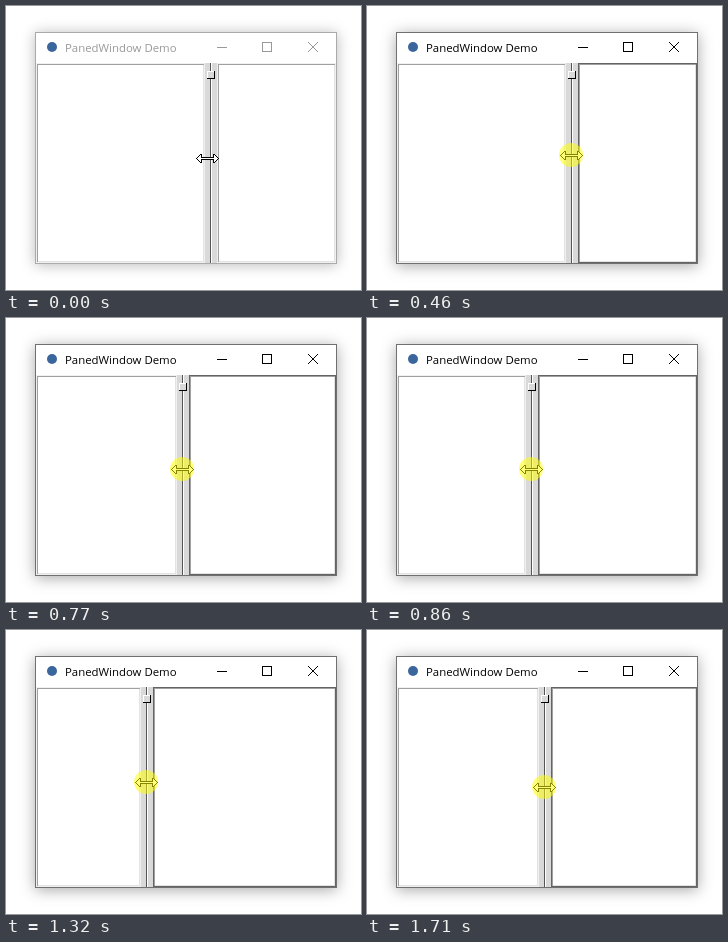
Recreate the animation shown at these times as an HTML page. Size 355x284 px, loop 1790 ms.

```html
<!DOCTYPE html>
<html lang="en">
<head>
<meta charset="utf-8">
<title>PanedWindow Demo</title>
<style>
  html, body { margin: 0; width: 100%; height: 100%; overflow: hidden; background: #fff; }
  #shadow {
    position: absolute; left: 29px; top: 26px; width: 302px; height: 232px;
    box-shadow: 0 1px 13px rgba(0, 0, 0, .28);
  }
  #shadow.active { box-shadow: 0 2px 14px rgba(0, 0, 0, .34); }
  svg { position: absolute; left: 0; top: 0; --ink: #999; --frame: #aaa; --focus: #f0f0f0; }
  svg.active { --ink: #000; --frame: #707070; --focus: #646464; }
  text { font: 11.4px "Open Sans", "Noto Sans", sans-serif; fill: var(--ink); }
  .glyph { fill: none; stroke: var(--ink); }
  .frame { fill: #fff; stroke: var(--frame); }
  .focus { fill: #fff; stroke: var(--focus); }
  .line { fill: none; }
  .crisp { shape-rendering: crispEdges; }
</style>
</head>
<body>
<div id="shadow"></div>
<svg id="stage" width="355" height="284" viewBox="0 0 355 284">
  <rect class="frame crisp" x="29.5" y="26.5" width="301" height="231"/>
  <circle cx="46" cy="41" r="5" fill="#3b669c"/>
  <text x="59" y="46">PanedWindow Demo</text>
  <path class="glyph crisp" d="M211 41.5h10M256.5 36.5h9v9h-9z"/>
  <path class="glyph" d="M302 36l10 10M312 36l-10 10"/>

  <!-- left pane -->
  <g class="crisp">
    <rect class="line" x="30.5" y="57.5" width="180" height="199" stroke="#f0f0f0"/>
    <path class="line" d="M31.5 256V58.5H211" stroke="#a0a0a0"/>
    <path class="line" d="M32 255.5H211" stroke="#e3e3e3"/>
  </g>

  <!-- right pane -->
  <g class="crisp">
    <rect id="pane" class="focus" y="57.5" height="199"/>
    <path id="paneTop" class="line" stroke="#a0a0a0"/>
    <path id="paneEnd" class="line" stroke="#e3e3e3"/>
  </g>

  <!-- sash and its handle -->
  <g id="sash" class="crisp">
    <rect x="197" y="59" width="1" height="197" fill="#e3e3e3"/>
    <rect x="198" y="57" width="1" height="200" fill="#f0f0f0"/>
    <rect x="199" y="57" width="12" height="200" fill="#d9d9d9"/>
    <rect x="204" y="57" width="1" height="200" fill="#555"/>
    <rect x="205" y="57" width="1" height="200" fill="#fff"/>
    <rect x="201" y="65" width="8" height="8" fill="#d9d9d9"/>
    <path class="line" d="M201.5 72V65.5H208" stroke="#fff"/>
    <path class="line" d="M201 72.5H208.5V65" stroke="#000"/>
  </g>

  <g id="pointer">
    <path class="crisp" d="M-10.5 .5l4-4h1v3h12v-3h1l4 4l-4 4h-1v-3h-12v3h-1z" fill="#fff" stroke="#000"/>
    <circle id="press" r="12" fill="#ff0" fill-opacity=".52"/>
  </g>
</svg>
<script>
  const LOOP = 1790, ARRIVE = 170, PRESS = 460;
  const start = { x: 201, y: 152 };
  const grip = { x: 204, y: 149 };

  // Each drag advances in equal ticks, shaped by its own easing.
  const drags = [
    { begin: 542, tick: 76, count: 8, from: grip, to: { x: 139, y: 152 },
      ease: u => (1 - Math.cos(Math.PI * u ** 0.795)) / 2 },
    { begin: 1320, tick: 78, count: 5, from: { x: 140, y: 152 }, to: { x: 177, y: 157 },
      ease: u => u ** 1.3 }
  ];

  const el = id => document.getElementById(id);
  const move = (id, x, y) => el(id).setAttribute('transform', `translate(${x} ${y})`);
  const mix = (a, b, u) => a + (b - a) * u;

  function pointerAt(time) {
    if (time < ARRIVE) return start;
    const drag = time < drags[1].begin ? drags[0] : drags[1];
    const { begin, tick, count, from, to, ease } = drag;
    const ticks = Math.floor((time - begin) / tick);
    const u = ease(Math.min(Math.max(ticks, 0), count) / count);
    return { x: Math.round(mix(from.x, to.x, u)), y: Math.ceil(mix(from.y, to.y, u)) };
  }

  function draw(time) {
    const { x, y } = pointerAt(time);
    const pressed = time >= PRESS;
    const shift = pressed ? x - grip.x : 0;
    const left = 211 + shift;

    el('stage').classList.toggle('active', pressed);
    el('shadow').classList.toggle('active', pressed);
    el('press').style.display = pressed ? '' : 'none';
    move('pointer', x, y);
    move('sash', shift, 0);
    el('pane').setAttribute('x', left + 0.5);
    el('pane').setAttribute('width', 329 - left);
    el('paneTop').setAttribute('d', `M${left + 1.5} 256V58.5H329`);
    el('paneEnd').setAttribute('d', `M${left + 2} 255.5H328.5V59`);
  }

  const origin = performance.now();
  function tick() {
    draw((performance.now() - origin) % LOOP);
    requestAnimationFrame(tick);
  }
  tick();
</script>
</body>
</html>
```
